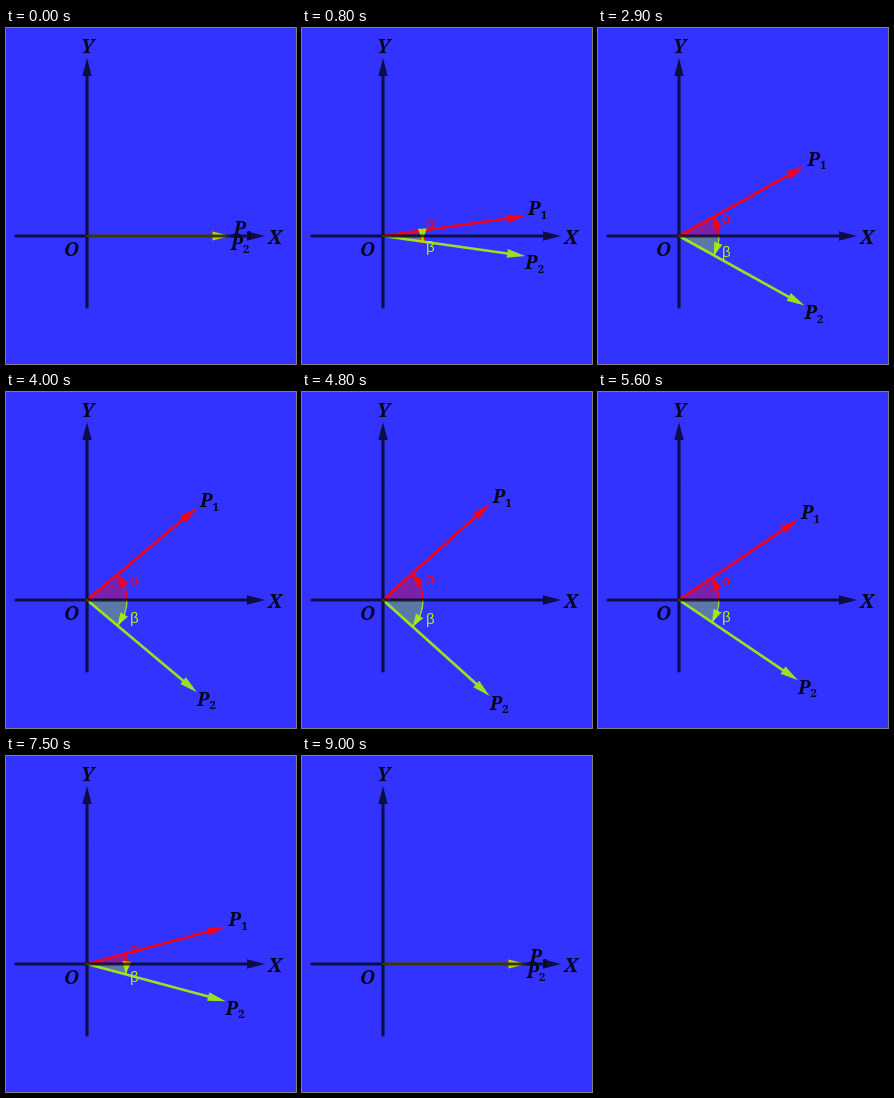
An HTML page for the animation above (9.1 s loop, 290x336 px).

```html
<!DOCTYPE html>
<html lang="en">
<head>
<meta charset="utf-8">
<title>Opposite angles</title>
<style>
  html, body { margin: 0; width: 100%; height: 100%; overflow: hidden; background: #3333ff; }
  svg { display: block; width: 290px; height: 336px; }
  .label { font: italic bold 19px "Noto Serif", "Liberation Serif", serif; fill: #05051c; }
  .sub { font: bold 11.5px "Noto Serif", "Liberation Serif", serif; }
  .greek { font: 15px "Liberation Sans", sans-serif; text-anchor: middle; }
  .axis { fill: #000; stroke: none; }
  .axis path { stroke: #000; stroke-width: 3.2; stroke-linecap: round; fill: none; }
</style>
</head>
<body>
<svg viewBox="0 0 290 336">
  <rect width="290" height="336" fill="#3333ff"/>
  <g id="rays"></g>
  <g class="axis" opacity=".72">
    <path d="M10 208H242M81 279V47"/>
    <polygon points="259,208 241,203.3 241,212.7"/>
    <polygon points="81,30 76.3,48 85.7,48"/>
  </g>
  <text class="label" x="262" y="216">X</text>
  <text class="label" x="75" y="25">Y</text>
  <text class="label" x="58" y="228">O</text>
  <g id="names"></g>
</svg>
<script>
const ORIGIN = { x: 81, y: 208 };
const REACH = 143.5, ARC = 40, STEP = 100, PEAK = 45;
const RAD = Math.PI / 180;

function add(parent, tag, attrs = {}) {
  const node = document.createElementNS("http://www.w3.org/2000/svg", tag);
  set(node, attrs);
  parent.append(node);
  return node;
}
function set(node, attrs) {
  for (const key in attrs) node.setAttribute(key, attrs[key]);
}

// Angles are in radians, counter-clockwise from the X axis.
function polar(radius, angle) {
  return { x: ORIGIN.x + radius * Math.cos(angle), y: ORIGIN.y - radius * Math.sin(angle) };
}
const pair = p => `${p.x.toFixed(2)},${p.y.toFixed(2)}`;

function head(tip, base, half) {
  const dx = tip.x - base.x, dy = tip.y - base.y, k = half / Math.hypot(dx, dy);
  const side = s => ({ x: base.x - s * dy * k, y: base.y + s * dx * k });
  return [tip, side(1), side(-1)].map(pair).join(" ");
}

function makeRay({ sign, color, opacity, greek, index, shift }) {
  const group = add(rays, "g", { fill: color, stroke: "none" });
  const angleMark = add(group, "g");
  const sector = add(angleMark, "path", { opacity: 0.35 });
  const arc = add(angleMark, "path", { fill: "none", stroke: color, "stroke-width": 1.3, opacity });
  const arcHead = add(angleMark, "polygon", { opacity });
  const letter = add(angleMark, "text", { class: "greek" });
  letter.textContent = greek;
  const vector = add(group, "g", { opacity });
  const shaft = add(vector, "path", { stroke: color, "stroke-width": 2.7, "stroke-linecap": "round" });
  const tipHead = add(vector, "polygon");
  const name = add(names, "text", { class: "label" });
  name.textContent = "P";
  add(name, "tspan", { class: "sub", dy: 3.5, "font-style": "normal" }).textContent = index;

  return degrees => {
    const angle = sign * degrees * RAD;
    const tip = polar(REACH, angle), start = polar(ARC, 0), end = polar(ARC, angle);
    const curve = `A${ARC} ${ARC} 0 0 ${sign > 0 ? 0 : 1} ${pair(end)}`;
    set(angleMark, { visibility: degrees ? "visible" : "hidden" });
    set(sector, { d: `M${pair(ORIGIN)}L${pair(start)}${curve}Z` });
    set(arc, { d: `M${pair(start)}${curve}` });
    set(arcHead, { points: head(end, polar(ARC, angle - sign * 13 / ARC), 4.4) });
    set(letter, { x: 128.3, y: ORIGIN.y + 4 - sign * (10.5 + 0.22 * degrees) });
    set(shaft, { d: `M${pair(ORIGIN)}L${pair(polar(REACH - 16, angle))}` });
    set(tipHead, { points: head(tip, polar(REACH - 18, angle), 4.4) });
    set(name, { x: tip.x + shift.x, y: tip.y + shift.y });
  };
}

const rays = document.getElementById("rays");
const names = document.getElementById("names");
const drawers = [
  { sign: 1, color: "#ff0010", opacity: 0.95, greek: "α", index: 1, shift: { x: 3, y: -0.7 } },
  { sign: -1, color: "#a6f808", opacity: 0.88, greek: "β", index: 2, shift: { x: 0, y: 13.5 } }
].map(makeRay);

function render(ms) {
  const step = Math.floor(ms / STEP) % (2 * PEAK + 1);
  const degrees = PEAK - Math.abs(PEAK - step);
  drawers.forEach(draw => draw(degrees));
}

const begin = performance.now();
function tick() {
  render(performance.now() - begin);
  requestAnimationFrame(tick);
}
tick();
</script>
</body>
</html>
```
